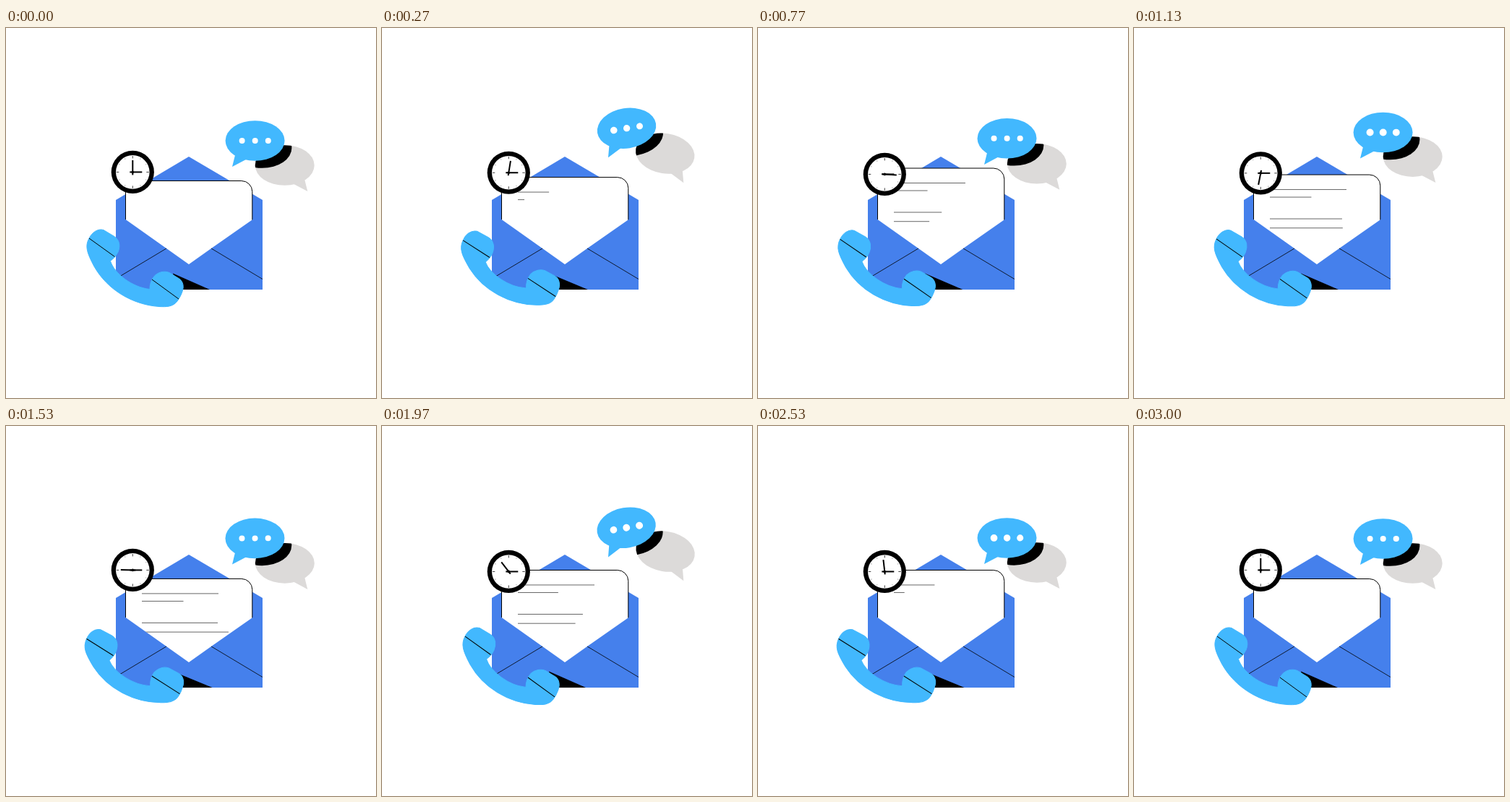
An HTML page with a canvas that plays this animation: 512 px wide and 512 px high, repeating every 3030 ms.

```html
<!DOCTYPE html>
<html lang="en">
<head>
<meta charset="utf-8">
<title>Mail and messages</title>
<style>
html, body { margin: 0; width: 100%; height: 100%; overflow: hidden; background: #fff; }
canvas { display: block; width: 100vmin; height: 100vmin; }
</style>
</head>
<body>
<canvas id="stage" width="512" height="512"></canvas>
<script>
const ctx = document.getElementById('stage').getContext('2d');
const LOOP = 3030, STEP = 100 / 3;
const WHITE = '#fff', BLACK = '#000', ENVELOPE = '#4580ec', SKY = '#42b8fe', GRAY = '#dcdad9';
const RAD = Math.PI / 180;

const clamp = x => Math.min(1, Math.max(0, x));
const smooth = x => { x = clamp(x); return x * x * (3 - 2 * x); };

// Smooth rise from start to peak, then smooth fall to end
const pulse = (t, start, peak, end) =>
  t < peak ? smooth((t - start) / (peak - start)) : smooth((end - t) / (end - peak));

// Smooth wave between 0 and 1
const wave = (t, period) => (1 - Math.cos(2 * Math.PI * t / period)) / 2;

const lift = t => wave(Math.min(t, 3000), 1500);
const ring = t => pulse(t % 1000, 0, 410, 1000);
const tilt = t => 10 * RAD * (pulse(t, 0, 330, 800) + pulse(t, 1500, 1880, 2580));
const hop = t => 13 * (pulse(t, 0, 290, 650) + pulse(t, 1490, 1860, 2240))
  + 12 * pulse(t, 610, 1080, 1490) + pulse(t, 2100, 2500, 3000);

// Cubic Bezier easing with end heights 0 and 1
function bezier(x, x1, x2) {
  let lo = 0, hi = 1;
  for (let i = 0; i < 24; i++) {
    const s = (lo + hi) / 2, r = 1 - s;
    if (3 * r * r * s * x1 + 3 * r * s * s * x2 + s * s * s < x) lo = s; else hi = s;
  }
  return smooth(lo);
}

function trace(points) {
  ctx.beginPath();
  points.forEach(([x, y]) => ctx.lineTo(x, y));
  ctx.closePath();
}

function poly(points, color) {
  trace(points);
  ctx.fillStyle = color;
  ctx.fill();
}

function line(x0, y0, x1, y1, color = BLACK, width = 1) {
  ctx.beginPath();
  ctx.moveTo(x0, y0);
  ctx.lineTo(x1, y1);
  ctx.strokeStyle = color;
  ctx.lineWidth = width;
  ctx.stroke();
}

function disc(x, y, r, color) {
  ctx.beginPath();
  ctx.arc(x, y, r, 0, 7);
  ctx.fillStyle = color;
  ctx.fill();
}

function drawPaper(t) {
  const top = 211.5 - 17.5 * lift(t);
  ctx.save();
  trace([[150, 150], [357, 150], [357, 254], [284, 305], [253, 327], [222, 305], [150, 254]]);
  ctx.clip();
  ctx.beginPath();
  ctx.roundRect(165.5, top, 175.3, 150, 15);
  ctx.fillStyle = WHITE;
  ctx.fill();
  ctx.strokeStyle = BLACK;
  ctx.lineWidth = 1;
  ctx.stroke();

  // Lines are written top down and wiped bottom up
  [[106, 20.5], [57.5, 31], [105, 61], [120, 73.7]].forEach(([len, dy], i) => {
    const enter = clamp((t - i * 166) / 1000);
    const leave = clamp((t - 2000 + i * 160) / 830);
    const part = Math.sin(enter * Math.PI / 2) * Math.cos(leave * Math.PI / 2);
    if (part > 0.005) line(188, top + dy, 188 + len * part, top + dy, '#666');
  });
  ctx.restore();
}

function drawEnvelope(t) {
  poly([[152, 238], [253, 178], [355, 238], [355, 362], [152, 362]], ENVELOPE);
  drawPaper(t);
  line(152, 347, 222, 305, BLACK, 0.8);
  line(284, 305, 355, 347.5, BLACK, 0.8);
  poly([[231, 339.5], [282 + 4 * ring(t), 362], [236, 362]], BLACK);
}

function drawClock(t) {
  ctx.save();
  ctx.translate(175.3, 199.4 + 3 * lift(t));
  disc(0, 0, 29.6, BLACK);
  disc(0, 0, 23.3, WHITE);
  for (let i = 0; i < 12; i++) {
    ctx.save();
    ctx.rotate(i * 30 * RAD);
    if (i % 3) line(0, -22, 0, -20.5, '#aaa');
    else line(0, -22.5, 0, -19, '#444');
    ctx.restore();
  }
  line(-4, 0, 13, 0, BLACK, 2);
  ctx.rotate(360 * RAD * bezier(clamp(t / 3000), 0.345, 0.29));
  line(0, 4, 0, -16.5, BLACK, 2);
  disc(0, 0, 1.8, BLACK);
  ctx.restore();
}

const handset = new Path2D(`M115 291C119 283 127 277 135 279.5L150 288.5
  C158 294 158 303 155 310Q152 317 144.5 322.5C150 340 175 359 199 361.5
  C199 353 202 347 206 342.5C212 337 220 336 226 338.5L239 346.5
  C245 350 247 358 243.5 366C242 370 240 374 237 378C231 386 222 386 212 385.5
  C175 383 140 362 122 330C112 311 109 302 115 291Z`);

function drawPhone(t) {
  ctx.save();
  ctx.translate(170, 349);
  ctx.rotate(-4 * RAD * ring(t));
  ctx.translate(-170, -349);
  ctx.fillStyle = ctx.strokeStyle = SKY;
  ctx.lineWidth = 1;
  ctx.fill(handset);
  ctx.stroke(handset);
  line(115, 291, 150.5, 316.5);
  line(202, 348, 239, 375);
  ctx.restore();
}

// Bubble with the tip of its tail at the origin, leaning right (1) or left (-1)
function fillBubble(side, color) {
  ctx.fillStyle = color;
  trace([[4.5 * side, -18], [0, 0], [20 * side, -10.5], [28 * side, -30]]);
  ctx.fill();
  ctx.beginPath();
  ctx.ellipse(31.6 * side, -36, 41, 27.8, 0, 0, 7);
  ctx.fill();
}

function drawBubbles(t) {
  const y = 192 - hop(t), turn = tilt(t);

  ctx.save();
  ctx.translate(417.3, 226 - hop(Math.max(0, t - 30)));
  ctx.rotate(turn);
  fillBubble(-1, GRAY);
  ctx.clip();
  ctx.rotate(-turn);
  ctx.translate(-94.5, 10 + y - 226 + hop(Math.max(0, t - 30)));
  ctx.rotate(-turn);
  fillBubble(1, BLACK);
  ctx.restore();

  ctx.save();
  ctx.translate(313, y);
  ctx.rotate(-turn);
  fillBubble(1, SKY);
  for (let i = 0; i < 3; i++) {
    disc(13.6 + 18.1 * i, -36, 4 + wave(Math.max(0, t - 40 * i), 750), WHITE);
  }
  ctx.restore();
}

function draw(now) {
  const t = Math.floor(((now % LOOP) + 4) / STEP) * STEP % LOOP;
  ctx.fillStyle = WHITE;
  ctx.fillRect(0, 0, 512, 512);
  drawEnvelope(t);
  drawClock(t);
  drawPhone(t);
  drawBubbles(t);
}

const start = performance.now();
function tick() {
  draw(performance.now() - start);
  requestAnimationFrame(tick);
}
tick();
</script>
</body>
</html>
```
